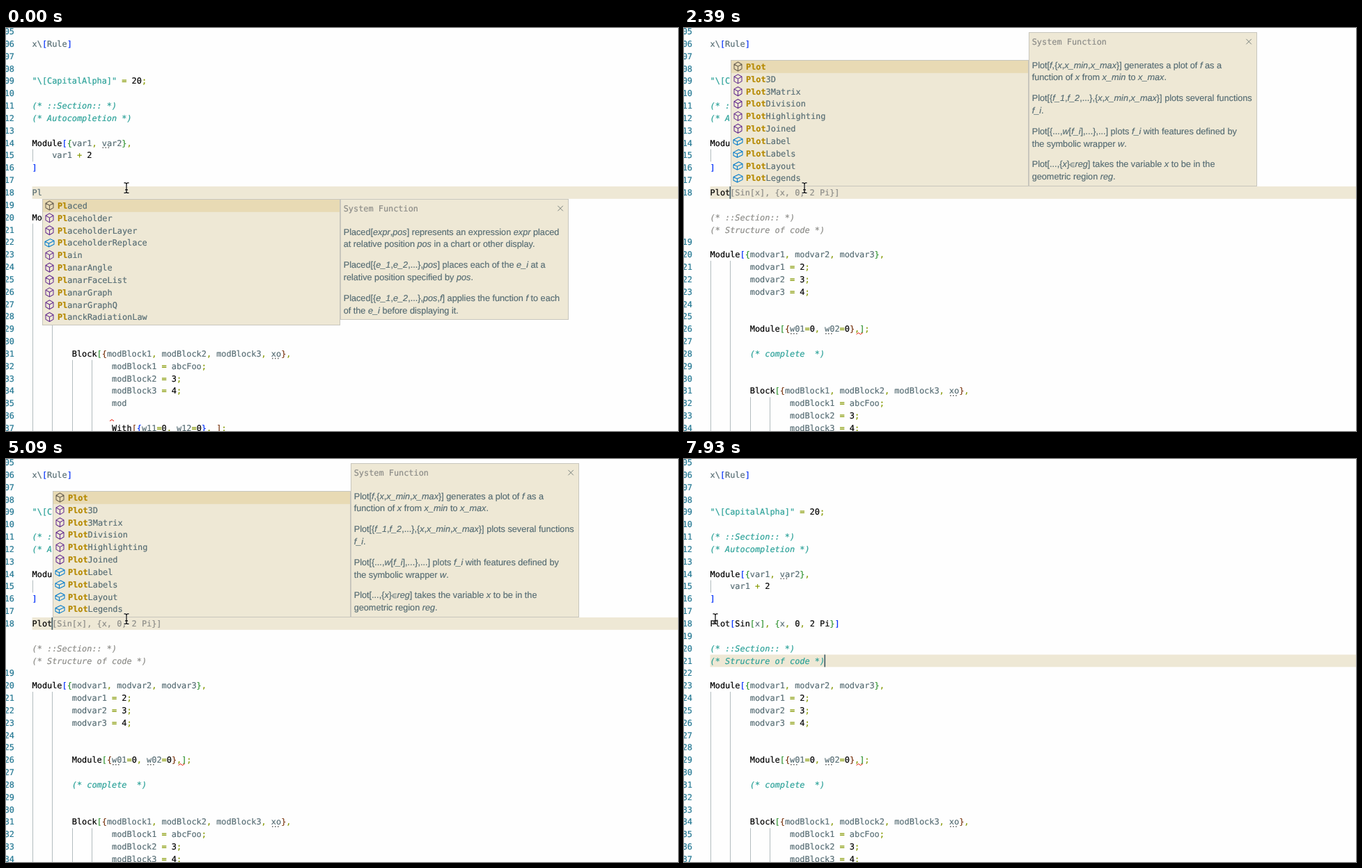
An HTML page that plays this animation: 965 px wide and 580 px high, repeating every 8000 ms.

```html
<!DOCTYPE html>
<html lang="en">
<head>
<meta charset="utf-8">
<title>Editor autocompletion</title>
<style>
html, body { margin: 0; width: 100%; height: 100%; overflow: hidden; background: #fefefe; }
svg { display: block; width: 965px; height: 580px; }
text { white-space: pre; color: #586e75; text-rendering: geometricPrecision; }
text, tspan { fill: currentColor; stroke: currentColor; stroke-width: .2; }
.mono { font: 11.88px "DejaVu Sans Mono", monospace; }
.doc { font: 12.69px "Liberation Sans", Arial, sans-serif; }
.num { color: #237893; text-anchor: end; }
.cm { color: #2aa198; font-style: italic; }
.st { color: #2aa198; }
.fn { color: #000; }
.op { color: #859900; }
.b0 { color: #0431fa; }
.b1 { color: #319331; }
.b2 { color: #7b3814; }
.ghost { color: #8c8c88; }
.hit { color: #b58900; font-weight: bold; }
.it { font-style: italic; }
.elem { font-size: 8.5px; }
.guide { stroke: #b3bcbf; }
.error { fill: none; stroke: #e51400; }
.panel { fill: #eee8d5; stroke: #c8c6bd; }
.icon { fill: none; stroke-width: 1.05; stroke-linejoin: round; }
</style>
</head>
<body>
<svg id="stage" viewBox="0 0 965 580" xmlns="http://www.w3.org/2000/svg"></svg>
<script>
const stage = document.getElementById('stage');
const LOOP = 8000, CHAR = 7.152, ROW = 17.84, LEFT = 37.6;
const colX = col => LEFT + col * CHAR;
const rowTop = row => 228 + (row - 13) * ROW;
const range = n => [...Array(n).keys()];

const span = (cls, s) => `<tspan class="${cls}">${s}</tspan>`;
const text = (x, y, body, cls = 'mono') => `<text class="${cls}" x="${x}" y="${y}">${body}</text>`;
const rect = (x, y, w, h, attrs) => `<rect x="${x}" y="${y}" width="${w}" height="${h}" ${attrs}/>`;

const TOKEN = /(\(\*.*?\*\))|("[^"]*")|([A-Za-z]\w*)|(\d+)|([[{])|([\]}])|([=+;,])/g;
const BUILTIN = /^(Module|Block|With|Plot|Sin|Pi)$/;

function highlight(code, depth = 0) {
  return code.replace(TOKEN, (s, comment, string, word, number, open, close) => {
    if (comment) return span('cm', s);
    if (string) return span('st', s);
    if (word) return BUILTIN.test(word) ? span('fn', s) : s;
    if (number) return span('fn', s);
    if (open) return span('b' + depth++ % 3, s);
    if (close) return span('b' + --depth % 3, s);
    return span('op', s);
  });
}

const codeText = (row, col, body) => text(colX(col), rowTop(row) + 13, body);
const line = (row, col, code, depth) => codeText(row, col, highlight(code, depth));
const guide = (col, from, to = 33) =>
  `<path class="guide" d="M${Math.round(colX(col)) + .5} ${rowTop(from)}V${rowTop(to)}"/>`;
const dots = (row, x) =>
  range(3).map(i => rect(x + i * 4, rowTop(row) + 14.8, 1.6, 1.6, 'fill="#6c6c6c"')).join('');

function squiggle(row, x, width) {
  const waves = range(Math.round(width / 3)).map(i => `l3 ${i % 2 ? 2.2 : -2.2}`).join('');
  return `<path class="error" d="M${x} ${rowTop(row) + 16.6}${waves}"/>`;
}

const HEADER = line(1, 0, 'x\\[Rule]') + line(4, 0, '"\\[CapitalAlpha]" = 20;') +
  line(6, 0, '(* ::Section:: *)') + line(7, 0, '(* Autocompletion *)') +
  line(9, 0, 'Module[{var1, var2},') + dots(9, 138.5) + guide(0, 10, 11) +
  line(10, 4, 'var1 + 2') + line(11, 0, ']', 1);

const BODY = [
  [0, 0, 'Module[{modvar1, modvar2, modvar3},', 0],
  [1, 8, 'modvar1 = 2;'], [2, 8, 'modvar2 = 3;'], [3, 8, 'modvar3 = 4;'],
  [6, 8, 'Module[{w01=0, w02=0},];', 1],
  [8, 8, '(* complete  *)'],
  [11, 8, 'Block[{modBlock1, modBlock2, modBlock3, xo},', 1],
  [12, 16, 'modBlock1 = abcFoo;'], [13, 16, 'modBlock2 = 3;'], [14, 16, 'modBlock3 = 4;'],
  [15, 16, 'mod'],
  [17, 16, 'With[{w11=0, w12=0}, ];', 2]
];

const body = first => BODY.map(([row, ...rest]) => line(first + row, ...rest)).join('') +
  guide(0, first + 1) + guide(4, first + 1) + guide(8, first + 12) + guide(12, first + 12);

const lineNumbers = label => range(33).map(row => {
  const n = label(row);
  return n ? text(12, rowTop(row) + 13, String(n).padStart(2, '0'), 'mono num') : '';
}).join('');

const CUBE = 'M0-6.6L5.5-3.4V3.2L0 6.4L-5.5 3.2V-3.4ZM-5.5-3.4L0-.3L5.5-3.4M0-.3V6.4';
const BRICK = 'M-6.5-1.6L1-5.5L6.5-2.8V2.2L-1 5.8L-6.5 3ZM-6.5-1.6L-1 .8L6.5-2.8M-1 .8V5.8';

const PLACED = {
  items: ['Placed', 'Placeholder', 'PlaceholderLayer', 'PlaceholderReplace', 'Plain',
    'PlanarAngle', 'PlanarFaceList', 'PlanarGraph', 'PlanarGraphQ', 'PlanckRadiationLaw'],
  option: i => i === 3,
  docs: [
    'Placed[*expr*,*pos*] represents an expression *expr* placed',
    'at relative position *pos* in a chart or other display.',
    'Placed[{*e_1*,*e_2*,...},*pos*] places each of the *e_i* at a',
    'relative position specified by *pos*.',
    'Placed[{*e_1*,*e_2*,...},*pos*,*f*] applies the function *f* to each',
    'of the *e_i* before displaying it.'
  ]
};
const PLOT = {
  items: ['', '3D', '3Matrix', 'Division', 'Highlighting', 'Joined',
    'Label', 'Labels', 'Layout', 'Legends'].map(s => 'Plot' + s),
  option: i => i > 5,
  docs: [
    'Plot[*f*,{*x*,*x_min*,*x_max*}] generates a plot of *f* as a',
    'function of *x* from *x_min* to *x_max*.',
    'Plot[{*f_1*,*f_2*,...},{*x*,*x_min*,*x_max*}] plots several functions',
    '*f_i*.',
    'Plot[{...,*w*[*f_i*],...},...] plots *f_i* with features defined by',
    'the symbolic wrapper *w*.',
    'Plot[...,{*x*}∈*reg*] takes the variable *x* to be in the',
    'geometric region *reg*.'
  ]
};

const rich = s => s.replace(/\*(.*?)\*/g, (_, inner) => span('it', inner))
  .replace('∈', span('elem', '∈'));

function suggestions({ items, option }, typed, x, y) {
  const rows = items.map((name, i) => {
    const cy = y + 9.6 + i * ROW;
    const color = i === 0 ? '#6a6152' : option(i) ? '#007acc' : '#652d90';
    return `<path class="icon" stroke="${color}" transform="translate(${x + 10.5} ${cy})" d="${option(i) ? BRICK : CUBE}"/>` +
      text(x + 22, cy + 4.3, span('hit', name.slice(0, typed)) + name.slice(typed));
  });
  return rect(x + .5, y + .5, 427, 181, 'class="panel"') +
    rect(x + 1, y + 1, 426, 17.8, 'fill="#e8dab4"') + rows.join('');
}

function details({ docs }, x, y) {
  const rows = docs.map((s, i) =>
    text(x + 4.7, y + 51.6 + (i >> 1) * 47.6 + i % 2 * 17.8, rich(s), 'doc'));
  const cross = `<path d="M${x + 312.4} ${y + 9.9}l7.4 7.4m0-7.4l-7.4 7.4" stroke="#77807c"/>`;
  return rect(x + .5, y + .5, 327, docs.length * 24 + 29, 'class="panel"') +
    text(x + 4.7, y + 17.6, span('ghost', 'System Function')) + cross + rows.join('');
}

function popup(list, typed, above) {
  const x = Math.round(38.1 + typed * CHAR);
  return suggestions(list, typed, x, above ? 46 : 246) +
    details(list, x + 428, above ? 6 : 246);
}

const currentLine = row => rect(37.6, rowTop(row), 928, ROW, 'fill="#eee8d5"');
const caret = (row, col) => rect(colX(col) - .7, rowTop(row), 1.7, ROW, 'fill="#46606a"');

function pointer(x) {
  const d = 'M-3.5-7H-2Q0-7 0-5Q0-7 2-7H3.5M0-5V5.5M-3.5 7.5H-2Q0 7.5 0 5.5Q0 7.5 2 7.5H3.5M-2 3H2';
  return `<g transform="translate(${x} 229.9)" fill="none"><path d="${d}" stroke="#fff" stroke-width="2.6" stroke-opacity=".6"/>` +
    `<path d="${d}" stroke="#000" stroke-width="1.2"/></g>`;
}

// Value of the last [start, value] step reached at time t.
const stepAt = (steps, t) => steps.filter(([start]) => start <= t).pop()[1];

const BLINKS = [300, 900, 1350, 1790, 2240, 2840, 3290, 3740, 4340, 4790, 5090, 6440, 6890, 7490, 7930];
const TYPED = [[0, 'Pl'], [300, 'Plo'], [1350, 'Plot']];
const POINTER = [[0, 173], [7190, 166], [7340, 129], [7490, 84], [7640, 58], [7790, 47], [7930, 45]];
const POPUPS = [
  [0, () => popup(PLACED, 2)],
  [600, () => popup(PLOT, 3)],
  [1640, () => popup(PLOT, 4)],
  [2390, () => popup(PLOT, 4, true)],
  [5240, () => '']
];

const currentHints = first => dots(first + 6, 153) + dots(first + 6, 203) +
  squiggle(first + 6, 247.5, 9) + dots(first + 11, 382);
const staleHints = () => dots(21, 153) + squiggle(21, 177.5, 7) + dots(26, 196) + squiggle(31, 153, 99);

function typing(t, showCaret) {
  const word = stepAt(TYPED, t);
  return currentLine(13) + HEADER + line(13, 0, word) + (showCaret ? caret(13, word.length) : '');
}

const beforeGhost = (t, on) => typing(t, on) + lineNumbers(row => row + 5) + body(15) +
  currentHints(15) + squiggle(31, 149, 7);

const withGhost = (t, on) => typing(t, on) +
  lineNumbers(row => row < 14 ? row + 5 : row > 16 ? row + 2 : 0) + body(18) + currentHints(18) +
  codeText(13, 4, span('ghost', '[Sin[x], {x, 0, 2 Pi}]')) +
  codeText(15, 0, span('ghost it', '(* ::Section:: *)')) +
  codeText(16, 0, span('ghost it', '(* Structure of code *)'));

const accepted = (t, on) => currentLine(16) + HEADER + lineNumbers(row => row + 5) +
  line(13, 0, 'Plot[Sin[x], {x, 0, 2 Pi}]') + line(15, 0, '(* ::Section:: *)') +
  line(16, 0, '(* Structure of code *)') + body(18) +
  (t < 6590 ? staleHints() : currentHints(18)) + (on ? caret(16, 23) : '');

const PHASES = [[0, beforeGhost], [2390, withGhost], [5840, accepted]];

function scene(t) {
  const caretOn = BLINKS.filter(b => b <= t).length % 2 === 1;
  return stepAt(PHASES, t)(t, caretOn) + stepAt(POPUPS, t)() + pointer(stepAt(POINTER, t));
}

let shown = '';
function draw(now) {
  const next = scene(now % LOOP);
  if (next !== shown) stage.innerHTML = shown = next;
  requestAnimationFrame(draw);
}
draw(0);
</script>
</body>
</html>
```
